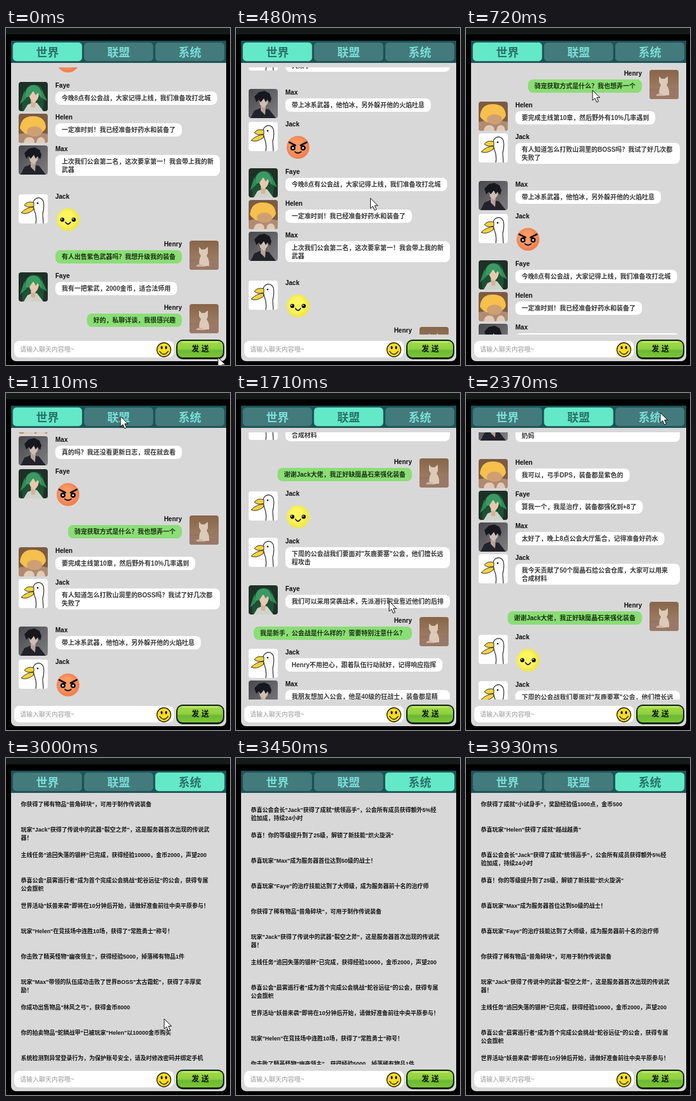
Write an HTML page that moves like this. It is 354x531 px and loops after 3960 ms.

```html
<!DOCTYPE html>
<html lang="zh-CN">
<head>
<meta charset="utf-8">
<style>
html, body { margin: 0; width: 100%; height: 100%; overflow: hidden; background: #000; }
svg { display: block; width: 354px; height: 531px; }
text { font: bold 10px "Liberation Sans", "Noto Sans CJK SC", "Noto Sans CJK", sans-serif; white-space: pre; }
.name { fill: #0c0c0c; }
.line { fill: #383838; }
.mine { fill: #17330f; }
.news { font-size: 9px; fill: #151515; }
.tab { font-size: 18px; font-weight: 900; text-anchor: middle; }
.hint { font-weight: 300; fill: #999; }
.send { font-size: 12px; font-weight: 900; fill: #0a1505; text-anchor: middle; }
</style>
</head>
<body>
<svg id="stage" viewBox="0 0 354 531">
  <defs>
    <clipPath id="view"><rect x="8" y="62" width="340" height="421"/></clipPath>
    <clipPath id="frame"><rect width="46" height="46" rx="4"/></clipPath>
    <radialGradient id="yellow" cx=".45" cy=".45"><stop offset=".55" stop-color="#fdf65e"/><stop offset="1" stop-color="#f0e64c"/></radialGradient>
    <radialGradient id="orange" cx=".45" cy=".45"><stop offset=".5" stop-color="#fd9a66"/><stop offset="1" stop-color="#f0804f"/></radialGradient>
    <linearGradient id="button" x2="0" y2="1"><stop offset="0" stop-color="#a4dc48"/><stop offset=".48" stop-color="#8ed03f"/><stop offset=".6" stop-color="#6cb932"/><stop offset="1" stop-color="#7cc63a"/></linearGradient>
    <linearGradient id="room" x2="0" y2="1"><stop offset="0" stop-color="#876549"/><stop offset=".6" stop-color="#9a7a60"/><stop offset="1" stop-color="#7c5a46"/></linearGradient>
    <linearGradient id="sky" x2="1" y2="1"><stop offset="0" stop-color="#48484c"/><stop offset="1" stop-color="#808083"/></linearGradient>

    <g id="faye" clip-path="url(#frame)">
      <rect width="46" height="46" fill="#1f3026"/>
      <path d="M6 46Q3 24 11 12Q20-1 35 7Q43 20 38 46Z" fill="#1d5136"/>
      <path d="M14 36l7-3h8l10 13H8Z" fill="#cfd3c9"/>
      <path d="M19 29h8l-1 11h-6Z" fill="#d9b097"/>
      <path d="M16 17Q23 12 32 18Q32 28 24 33Q17 29 16 17Z" fill="#e9c8b0"/>
      <path d="M10 25Q10 4 25 5Q38 7 36 26L30 17 27 21 23 14 17 23Z" fill="#3a9a62"/>
      <path d="M9 14L2 35 12 26M36 11L45 30 36 25" fill="#2f8a55"/>
    </g>
    <g id="helen" clip-path="url(#frame)">
      <rect width="46" height="46" fill="#7d5b42"/>
      <path d="M0 32Q24 26 46 32V46H0Z" fill="#b08b72"/>
      <path d="M2 23Q4 3 23 4Q42 4 43 22Q38 33 23 33Q8 34 2 23Z" fill="#f5c04b"/>
      <ellipse cx="25" cy="28" rx="12" ry="8" fill="#cf9f74"/>
      <path d="M8 46Q9 37 17 37T25 46M28 46Q29 37 35 37T42 46" fill="#e2cbb6"/>
    </g>
    <g id="max" clip-path="url(#frame)">
      <rect width="46" height="46" fill="url(#sky)"/>
      <path d="M3 46L9 34 19 30 32 32 43 46Z" fill="#22232a"/>
      <path d="M19 27h8l-1 14-7-7Z" fill="#b6a298"/>
      <path d="M16 14L30 14 30 23 24 30 18 25Z" fill="#cfbeb4"/>
      <path d="M12 21L9 12 16 5 25 3 33 7 36 15 34 22 30 17 27 21 24 15 19 21 16 17Z" fill="#17181e"/>
    </g>
    <g id="jack" clip-path="url(#frame)">
      <rect width="46" height="46" fill="#fefefe"/>
      <path d="M27 46Q29 35 25 26Q20 11 27 7Q35 3 39 11Q41 20 38 31L39 46" fill="none" stroke="#222" stroke-width="1.1"/>
      <path d="M24 13Q14 10 9 17Q15 22 24 19ZM24 20Q13 20 4 29Q12 33 23 25Z" fill="#f4d33d" stroke="#222" stroke-width=".9"/>
      <circle cx="30" cy="14" r="1.3"/>
    </g>
    <g id="henry" clip-path="url(#frame)">
      <rect width="46" height="46" fill="url(#room)"/>
      <path d="M0 33L46 30V46H0Z" fill="#9a7868"/>
      <path d="M15 10l4 4h5l5-4v10l-2 4q5 6 4 16H16q-2-9 2-16l-3-5Z" fill="#dccab8"/>
      <path d="M17 37Q9 38 11 41H26Z" fill="#cdb7a3"/>
    </g>

    <g id="smile">
      <circle r="18" fill="url(#yellow)"/>
      <circle cx="-9" cy="0" r="3.2"/><circle cx="9" cy="0" r="3.2"/>
      <circle cx="-10" cy="-1" r="1" fill="#fff"/><circle cx="8" cy="-1" r="1" fill="#fff"/>
      <path d="M-4 4Q0 10 4 4" fill="none" stroke="#111" stroke-width="1.8" stroke-linecap="round"/>
    </g>
    <g id="angry">
      <circle r="18" fill="url(#orange)"/>
      <path d="M-14-8L-4-3M14-8L4-3" stroke="#111" stroke-width="2.6" stroke-linecap="round"/>
      <circle cx="-8" cy="1" r="4"/><circle cx="8" cy="1" r="4"/>
      <circle cx="-8" cy="1" r="1.5" fill="#fff"/><circle cx="8" cy="1" r="1.5" fill="#fff"/>
      <path d="M-5 7Q0 11 5 7" fill="none" stroke="#111" stroke-width="1.8" stroke-linecap="round"/>
    </g>
  </defs>

  <rect width="354" height="531"/>
  <rect width="354" height="10" fill="#151a18"/>
  <rect x="8" y="20" width="340" height="505" rx="8" fill="#d8d8d8"/>
  <rect x="8" y="20" width="340" height="35" fill="#1c5357"/>
  <g id="tabs"></g>
  <g clip-path="url(#view)" id="lists"></g>

  <rect x="13" y="493" width="252" height="26" rx="8" fill="#fff"/>
  <text class="hint" x="22" y="509.500">请输入聊天内容哦~</text>
  <g transform="translate(249.500 507)">
    <circle r="11" fill="#fbdc20" stroke="#1c1a08" stroke-width="1.300"/>
    <ellipse cx="-3.500" cy="-3.500" rx="1.500" ry="2.600"/><ellipse cx="3.500" cy="-3.500" rx="1.500" ry="2.600"/>
    <path d="M-7 2Q0 12 7 2" fill="none" stroke="#111" stroke-width="1.300"/>
  </g>
  <rect x="269" y="491" width="76" height="31" rx="10" fill="#12200b"/>
  <rect x="271" y="493" width="72" height="26" rx="8" fill="url(#button)"/>
  <path d="M279 495H335" stroke="#c5ee78" stroke-width="1.500" stroke-linecap="round"/>
  <text class="send" x="307" y="509.500">发 送</text>
  <path id="cursor" d="M0 0V16L3.800 12.600 6.600 19 9.400 17.700 6.700 11.600H11.700Z" fill="#fff" stroke="#111"/>
</svg>

<script>
const LOOP = 3960, STEP = 30;
const byId = id => document.getElementById(id);

// Each message: speaker, then lines split by "|" or an emoji id after "#".
const world = [
  "helen:听说新版本加了骑宠，你们看了吗",
  "max:真的吗？我还没看更新日志，现在就去看",
  "faye:#angry",
  "henry:骑宠获取方式是什么？我也想弄一个",
  "helen:要完成主线第10章，然后野外有10%几率遇到",
  "jack:有人知道怎么打败山洞里的BOSS吗？我试了好几次都|失败了",
  "max:带上冰系武器，他怕冰，另外躲开他的火焰吐息",
  "jack:#angry",
  "faye:今晚8点有公会战，大家记得上线，我们准备攻打北城",
  "helen:一定准时到！我已经准备好药水和装备了",
  "max:上次我们公会第二名，这次要拿第一！我会带上我的新|武器",
  "jack:#smile",
  "henry:有人出售紫色武器吗？我想升级我的装备",
  "faye:我有一把紫武，2000金币，适合法师用",
  "henry:好的，私聊详谈，我很感兴趣"
];
const guild = [
  "max:今晚打副本，有人一起吗？现在还缺一个输出和一个|奶妈",
  "helen:我可以，弓手DPS，装备都是紫色的",
  "faye:算我一个，我是治疗，装备都强化到+8了",
  "max:太好了，晚上8点公会大厅集合，记得准备好药水",
  "jack:我今天贡献了50个魔晶石给公会仓库，大家可以用来|合成材料",
  "henry:谢谢Jack大佬，我正好缺魔晶石来强化装备",
  "jack:#smile",
  "jack:下周的公会战我们要面对\"灰鹿要塞\"公会，他们擅长远|程攻击",
  "faye:我们可以采用突袭战术，先派潜行职业靠近他们的后排",
  "henry:我是新手，公会战是什么样的？需要特别注意什么？",
  "jack:Henry不用担心，跟着队伍行动就好，记得响应指挥",
  "max:我朋友想加入公会，他是40级的狂战士，装备都是精|良品质",
  "jack:没问题，让他直接申请就好"
];
const news = [
  "你获得了成就\"小试身手\"，奖励经验值1000点，金币500",
  "恭喜玩家\"Helen\"获得了成就\"越战越勇\"",
  "恭喜公会会长\"Jack\"获得了成就\"统领高手\"，公会所有成员获得额外5%经|验加成，持续24小时",
  "恭喜！你的等级提升到了25级，解锁了新技能\"炽火旋涡\"",
  "恭喜玩家\"Max\"成为服务器首位达到50级的战士！",
  "恭喜玩家\"Faye\"的治疗技能达到了大师级，成为服务器前十名的治疗师",
  "你获得了稀有物品\"兽角碎块\"，可用于制作传说装备",
  "玩家\"Jack\"获得了传说中的武器\"裂空之斧\"，这是服务器首次出现的传说武|器！",
  "主线任务\"追回失落的银杯\"已完成，获得经验10000，金币2000，声望200",
  "恭喜公会\"晨雾巡行者\"成为首个完成公会挑战\"蛇谷远征\"的公会，获得专属|公会旗帜",
  "世界活动\"妖兽来袭\"即将在10分钟后开始，请做好准备前往中央平原参与！",
  "玩家\"Helen\"在竞技场中连胜10场，获得了\"常胜勇士\"称号！",
  "你击败了精英怪物\"幽夜领主\"，获得经验5000，掉落稀有物品1件",
  "玩家\"Max\"带领的队伍成功击败了世界BOSS\"太古霜蛇\"，获得了丰厚奖|励！",
  "你成功出售物品\"林风之弓\"，获得金币8000",
  "你的拍卖物品\"蛇鳞战甲\"已被玩家\"Helen\"以10000金币购买",
  "系统检测到异常登录行为，为保护账号安全，请及时修改密码并绑定手机",
  "服务器将于今晚进行维护，请提前下线",
  "每日签到奖励已发放，请到邮箱领取"
];

function add(parent, tag, attrs, content) {
  const el = document.createElementNS("http://www.w3.org/2000/svg", tag);
  for (const key in attrs) el.setAttribute(key, attrs[key]);
  if (content) el.textContent = content;
  return parent.appendChild(el);
}

function addMessage(list, y, who, body) {
  const own = who === "henry", emoji = body[0] === "#";
  const g = add(list, "g", { transform: `translate(0 ${y})` });
  add(g, "use", { href: "#" + who, x: own ? 290 : 20, y: emoji ? -3 : -5 });
  add(g, "text", { class: "name", x: own ? 278 : 78, y: 3.6, "text-anchor": own ? "end" : "start" },
    who[0].toUpperCase() + who.slice(1));
  if (emoji) {
    add(g, "use", { href: body, transform: "translate(98 37)" });
    return;
  }
  const lines = body.split("|");
  const bubble = add(g, "rect", { y: 10, height: lines.length > 1 ? 33 : 21, rx: 8, fill: own ? "#8bdd76" : "#fff" });
  const texts = lines.map((line, i) => add(g, "text", { class: own ? "mine" : "line", y: 24 + 13 * i }, line));
  const width = lines.length > 1 ? 260 : texts[0].getComputedTextLength() + 20;
  const left = own ? 278 - width : 78;
  bubble.setAttribute("x", left);
  bubble.setAttribute("width", width);
  texts.forEach(text => text.setAttribute("x", left + 10));
}

function buildChat(messages) {
  const list = add(byId("lists"), "g");
  let y = 490;
  for (const message of [...messages].reverse()) {
    const [who, body] = message.split(":");
    y -= /[#|]/.test(body) ? 75 : 50;
    addMessage(list, y, who, body);
  }
  return list;
}

function buildNews() {
  const list = add(byId("lists"), "g");
  news.forEach((item, row) => item.split("|").forEach((line, i) =>
    add(list, "text", { class: "news", x: 23.5, y: 476.3 - 40 * (news.length - 1 - row) + 13 * i }, line)));
  return list;
}

// A list is dragged from press to release, then glides on; speed in px/s.
const pages = [
  { title: "世界", list: buildChat(world), from: 0, press: 214, release: 420, speed: 855 },
  { title: "联盟", list: buildChat(guild), from: 1230, press: 1410, release: 1710, speed: 617 },
  { title: "系统", list: buildNews(), from: 2430, press: 2719, release: 3000, speed: 569 }
];
pages.forEach((page, i) => {
  const x = 10.5 + 112.5 * i;
  page.tab = add(byId("tabs"), "rect", { x, y: 22.5, width: 110, height: 30, rx: 6, stroke: "#123f42", "stroke-opacity": .45 });
  page.label = add(byId("tabs"), "text", { class: "tab", x: x + 55, y: 44.5 }, page.title);
});

function scrollAt(t, { press, release, speed }) {
  const span = (release - press) / 1000;
  const held = Math.min(Math.max(t - press, 0) / 1000, span);
  const glide = Math.max(t - release, 0) / 1000;
  return speed * held * held / (2 * span) + speed / 2 * (1 - Math.exp(-2 * glide));
}

const path = [
  [0, 335, 519], [214, 218, 200], [420, 214, 288], [720, 200, 98], [1010, 184, 20],
  [1110, 181, 37], [1220, 181, 37], [1410, 236, 236], [1710, 242, 328], [2160, 298, 34],
  [2250, 305, 21], [2370, 307, 31], [2440, 307, 32], [2719, 257, 331], [3000, 250, 411],
  [3240, 325, 474], [3400, 358, 536], [LOOP, 358, 536]
];

function cursorAt(t) {
  const i = path.findIndex(p => p[0] > t);
  const [t0, x0, y0] = path[i - 1], [t1, x1, y1] = path[i];
  const u = (t - t0) / (t1 - t0);
  const dragging = pages.some(p => p.press === t0);
  const k = dragging ? u * u : u * u * (3 - 2 * u);
  return [x0 + (x1 - x0) * k, y0 + (y1 - y0) * k];
}

function render(t) {
  const current = pages.filter(p => p.from <= t).pop();
  for (const page of pages) {
    const active = page === current;
    page.tab.setAttribute("fill", active ? "#63e9c7" : "#437a7c");
    page.label.setAttribute("fill", active ? "#2a706a" : "#7adfd8");
    page.list.setAttribute("display", active ? "inline" : "none");
  }
  current.list.setAttribute("transform", `translate(0 ${Math.round(scrollAt(t, current))})`);
  byId("cursor").setAttribute("transform", `translate(${cursorAt(t)})`);
}

const start = performance.now();
function tick() {
  const t = (performance.now() - start) % LOOP;
  render(Math.floor(t / STEP) * STEP);
  requestAnimationFrame(tick);
}
tick();
</script>
</body>
</html>
```
